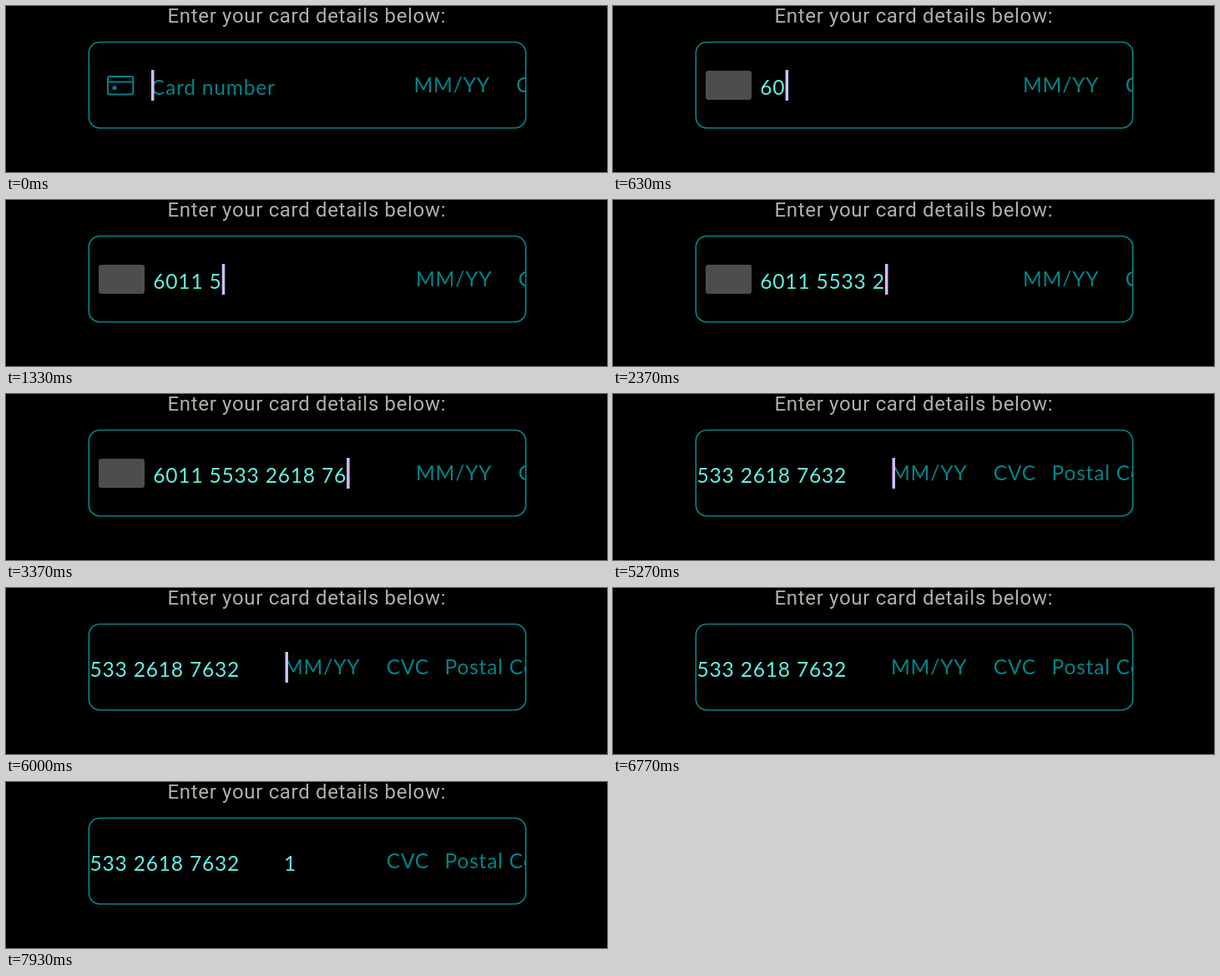
Write an HTML page that moves like this. It is 720 px wide and 200 px high and loops after 8 s.

```html
<!DOCTYPE html>
<html lang="en">
<head>
<meta charset="utf-8">
<title>Card form</title>
<style>
  html, body { margin: 0; width: 100%; height: 100%; overflow: hidden; background: #000; }
  svg { display: block; width: 720px; height: 200px; }
  text { white-space: pre; }
  .title { font: 24px Roboto, sans-serif; letter-spacing: .028em; fill: #b0b0a9; }
  .field { font: 24.6px Lato, sans-serif; letter-spacing: .03125em; fill: #62f0df; }
  .hint { fill: #018488; }
  .line { fill: none; stroke: #018488; stroke-width: 2; }
</style>
</head>
<body>
<svg viewBox="0 0 720 200">
  <clipPath id="inside"><rect x="100" y="44" width="522.5" height="103" rx="12"/></clipPath>
  <text class="title" x="193.5" y="20">Enter your card details below:</text>
  <g clip-path="url(#inside)">
    <g id="row">
      <g id="genericCard">
        <rect class="line" x="124.5" y="85" width="30.3" height="21.5" rx="1.5"/>
        <path class="line" d="M124.5 91.5h30.3"/>
        <circle cx="132.5" cy="98.5" r="2.6" fill="#018488"/>
      </g>
      <rect id="brandCard" x="111" y="78" width="55" height="35" rx="3" fill="#4d4d50"/>
      <text id="number" class="field" x="176.3" y="107"></text>
      <text id="expiry" class="field" x="491" y="104"></text>
      <text class="field hint" x="613.7" y="104">CVC</text>
      <text class="field hint" x="683.6" y="104">Postal Code</text>
      <rect id="cursor" y="77" width="3.5" height="37" fill="#d3bcf6"/>
    </g>
  </g>
  <rect class="line" x="99.3" y="43.5" width="523.4" height="103.5" rx="13" style="stroke-width:1.7"/>
</svg>
<script>
  const LOOP = 8000, BLINK = 500, SCROLL = 158, SCROLL_TIME = 200;
  const DIGITS = "6011553326187632";
  const keyTimes = [250, 500, 750, 1000, 1250];
  for (let i = 1; i <= 9; i++) keyTimes.push(1250 + i * 228);
  keyTimes.push(3950, 4900);
  const numberDone = 4900, expiryTyped = 7200;

  const [row, genericCard, brandCard, number, expiry, cursor] =
    ["row", "genericCard", "brandCard", "number", "expiry", "cursor"].map(id => document.getElementById(id));

  const show = (el, on) => el.setAttribute("visibility", on ? "visible" : "hidden");
  const grouped = digits => digits.replace(/(\d{4})(?=\d)/g, "$1 ");

  function setField(el, value, hint) {
    const label = value || hint;
    if (el.textContent !== label) el.textContent = label;
    el.classList.toggle("hint", !value);
  }

  function draw(t) {
    const count = keyTimes.filter(k => k <= t).length;
    const branded = count >= 2;
    const inExpiry = t >= numberDone;
    const month = t >= expiryTyped ? "1" : "";

    setField(number, grouped(DIGITS.slice(0, count)), "Card number");
    setField(expiry, month, "MM/YY");
    expiry.setAttribute("y", month ? 107 : 104);
    show(genericCard, !branded);
    show(brandCard, branded);

    const p = Math.min(1, Math.max(0, (t - numberDone) / SCROLL_TIME));
    const eased = 1 - (1 - p) ** 2;
    const shift = branded ? -SCROLL * eased : -2.5;
    row.setAttribute("transform", `translate(${shift} 0)`);

    const active = inExpiry ? expiry : number;
    const typed = inExpiry ? month : count;
    const end = typed ? active.getComputedTextLength() : 0;
    cursor.setAttribute("x", +active.getAttribute("x") + end + (inExpiry ? 1.5 : 0.2));

    const lastChange = month ? expiryTyped : count ? keyTimes[count - 1] : 0;
    show(cursor, Math.floor((t - lastChange) / BLINK) % 2 === 0);
  }

  const start = performance.now();
  function tick() {
    draw((performance.now() - start) % LOOP);
    requestAnimationFrame(tick);
  }
  tick();
</script>
</body>
</html>
```
